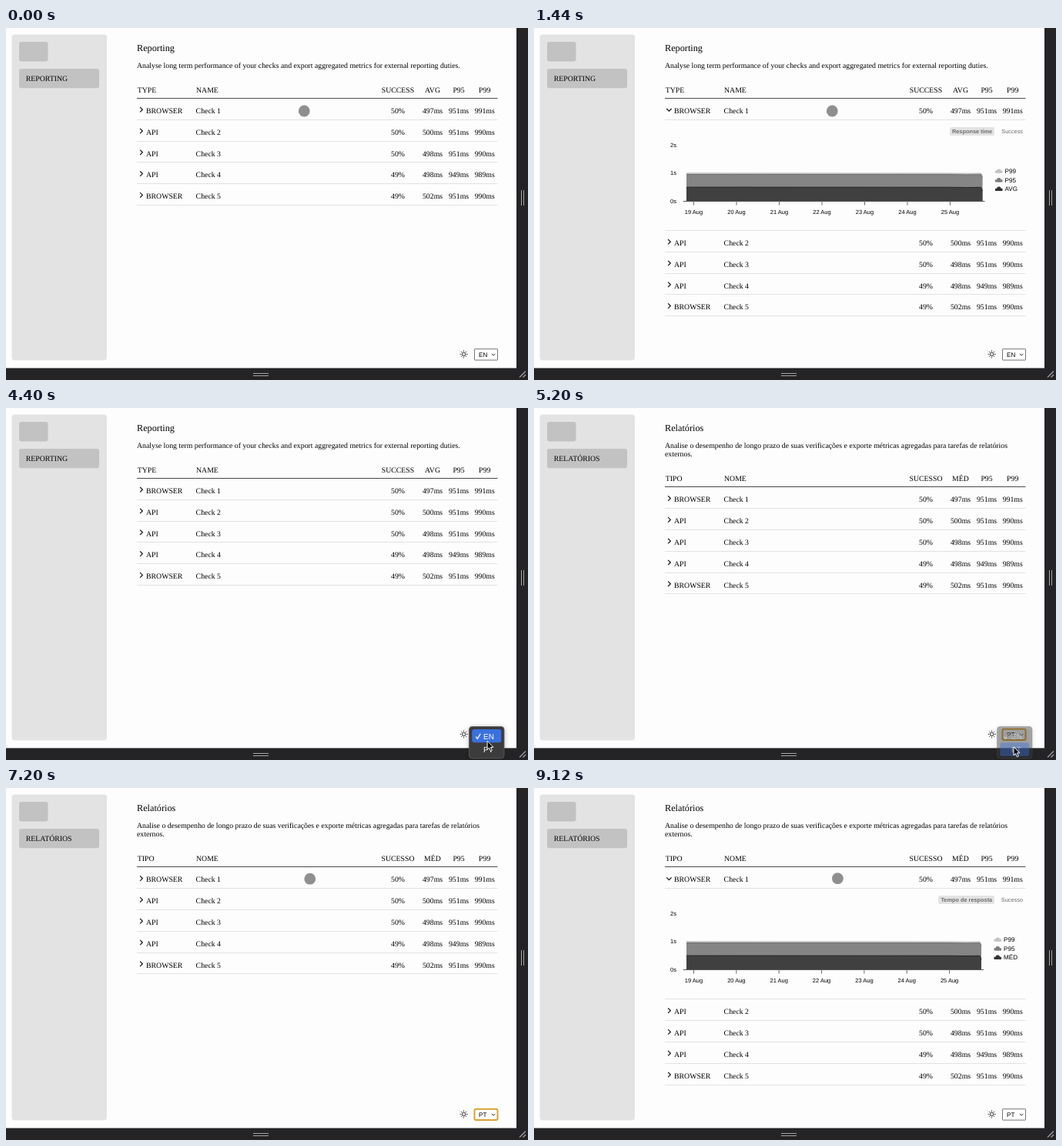
Animation of 678 by 458 pixels, one loop 9.28 s. Source, as an HTML page with a canvas:

```html
<!DOCTYPE html>
<html lang="en">
<head>
<meta charset="utf-8">
<title>Reporting</title>
<style>
  html, body { margin: 0; width: 100%; height: 100%; overflow: hidden; background: #fdfdfd; }
  canvas { display: block; width: 678px; height: 458px; }
</style>
</head>
<body>
<canvas id="stage"></canvas>
<script>
const W = 678, H = 458, LOOP = 9280, STEP = 80;
const SERIF = '"Liberation Serif", serif';
const SANS = '"Liberation Sans", sans-serif';
const BODY = '9.8px ' + SERIF;

const canvas = document.getElementById('stage');
const ctx = canvas.getContext('2d');
const dpr = window.devicePixelRatio || 1;
canvas.width = W * dpr;
canvas.height = H * dpr;

const EN = {
  title: 'Reporting', nav: 'REPORTING',
  intro: ['Analyse long term performance of your checks and export aggregated metrics for external reporting duties.'],
  type: 'TYPE', name: 'NAME', cols: ['SUCCESS', 'AVG', 'P95', 'P99'],
  tabs: ['Response time', 'Success'], tabX: 540, code: 'EN',
  shift: 0, end: 582.5, pitch: 55.5, legendX: 599
};
const PT = {
  title: 'Relatórios', nav: 'RELATÓRIOS',
  intro: ['Analise o desempenho de longo prazo de suas verificações e exporte métricas agregadas para tarefas de relatórios', 'externos.'],
  type: 'TIPO', name: 'NOME', cols: ['SUCESSO', 'MÉD', 'P95', 'P99'],
  tabs: ['Tempo de resposta', 'Sucesso'], tabX: 525, code: 'PT',
  shift: 11.4, end: 581, pitch: 55.35, legendX: 597.5
};
const COL_X = [509, 554, 588, 621.7];
const ROWS = [
  ['BROWSER', '50%', 497, 951, 991],
  ['API', '50%', 500, 951, 990],
  ['API', '50%', 498, 951, 990],
  ['API', '49%', 498, 949, 989],
  ['BROWSER', '49%', 502, 951, 990]
];
const PANEL = 144.2, ROW = 27.8;

const clamp = v => Math.max(0, Math.min(1, v));
const smooth = u => u * u * (3 - 2 * u);

// CSS "ease": cubic-bezier(.25, .1, .25, 1)
function cssEase(x) {
  let lo = 0, hi = 1;
  for (let i = 0; i < 20; i++) {
    const m = (lo + hi) / 2, n = 1 - m;
    if (.75 * n * n * m + .75 * n * m * m + m * m * m < x) lo = m; else hi = m;
  }
  const n = 1 - lo;
  return .3 * n * n * lo + 3 * n * lo * lo + lo * lo * lo;
}

function text(s, x, y, font = BODY, color = '#000', align = 'left') {
  ctx.font = font;
  ctx.fillStyle = color;
  ctx.textAlign = align;
  ctx.fillText(s, x, y);
}

function box(x, y, w, h, r, color) {
  ctx.fillStyle = color;
  ctx.beginPath();
  ctx.roundRect(x, y, w, h, r);
  ctx.fill();
}

function line(points, color, width = 1) {
  ctx.strokeStyle = color;
  ctx.lineWidth = width;
  ctx.beginPath();
  points.forEach(([x, y], i) => i ? ctx.lineTo(x, y) : ctx.moveTo(x, y));
  ctx.stroke();
}

const hline = (x0, x1, y, color) => line([[x0, y], [x1, y]], color);

function drawSidebar(lang) {
  box(7.5, 8.5, 123.5, 424, 4, '#e3e3e3');
  box(17, 18, 37.5, 25.5, 3, '#c2c2c2');
  box(17, 53, 104, 25.3, 3, '#c2c2c2');
  text(lang.nav, 25.7, 69.3);
}

function drawFrame() {
  box(663, 0, 15, H, 0, '#242426');
  box(0, 442.4, W, 15.6, 0, '#242426');
  const grip = '#a2a2a2';
  line([[669.5, 211], [669.5, 231]], grip);
  line([[672.5, 211], [672.5, 231]], grip);
  hline(321, 341, 449.5, grip);
  hline(321, 341, 452.5, grip);
  line([[667, 454.5], [675, 446.5]], grip, 1.2);
  line([[671.5, 454.5], [675, 451]], grip, 1.2);
}

function drawTable(lang, open) {
  const top = lang.shift;
  text(lang.title, 170, 30, '12.25px ' + SERIF);
  lang.intro.forEach((s, i) => text(s, 170, 52 + i * 11.3));
  text(lang.type, 170.7, 83.7 + top);
  text(lang.name, 247, 83.7 + top);
  lang.cols.forEach((s, i) => text(s, COL_X[i], 83.7 + top, BODY, '#000', 'center'));
  hline(170, 638.5, Math.floor(91 + top) + .5, '#4a4a4a');

  ROWS.forEach(([type, rate, ...ms], i) => {
    const y = 107.6 + top + i * ROW + (open && i ? PANEL : 0);
    if (open && !i) line([[172.2, y - 2.6], [175.4, y + .6], [178.6, y - 2.6]], '#111', 1.2);
    else line([[174.1, y - 4.6], [177.3, y - 1.4], [174.1, y + 1.8]], '#111', 1.2);
    const base = y + 3.3;
    text(type, 182, base);
    text('Check ' + (i + 1), 246.6, base);
    [rate, ...ms.map(v => v + 'ms')].forEach((s, c) => text(s, COL_X[c], base, BODY, '#000', 'center'));
    hline(170, 638.5, Math.floor(y + 11.7) + .5, '#e2e2e2');
  });
  if (open) hline(170, 638.5, Math.floor(119.3 + top + PANEL) + .5, '#e2e2e2');
}

function drawArea(end, value, dip, fill, stroke) {
  const y = 225.5 - value * 36.8;
  const top = [[198, y], [end - 45, y + .1], [end - 20, y + .4], [end - 2, y + .2], [end, y + dip]];
  ctx.fillStyle = fill;
  ctx.beginPath();
  ctx.moveTo(198, 225.5);
  top.forEach(p => ctx.lineTo(...p));
  ctx.lineTo(end, 225.5);
  ctx.fill();
  line(top, stroke);
}

function drawChart(lang, reveal) {
  const label = '7.5px ' + SANS;
  ctx.save();
  ctx.translate(0, Math.round(lang.shift));

  box(lang.tabX, 129, 598 - lang.tabX, 11, 2.5, '#e3e3e3');
  text(lang.tabs[0], 595.2, 137.2, 'bold 7.35px ' + SANS, '#6c6c6c', 'right');
  text(lang.tabs[1], 635, 137.2, '7.35px ' + SANS, '#6c6c6c', 'right');

  ['0s', '1s', '2s'].forEach((s, i) => text(s, 185, 228.2 - i * 36.8, label, '#000', 'right'));

  ctx.save();
  ctx.beginPath();
  ctx.rect(198, 140, (lang.end + 1 - 198) * reveal, 90);
  ctx.clip();
  drawArea(lang.end, .997, 4, '#c6c6c6', '#bdbdbd');
  drawArea(lang.end, .951, 4, '#858585', '#6e6e6e');
  drawArea(lang.end, .5, 5, '#404040', '#242424');
  ctx.restore();

  hline(194, lang.end + 3, 225.5, '#555');
  for (let i = 0; i < 7; i++) {
    const x = 207.5 + i * lang.pitch;
    line([[x, 225], [x, 230.5]], '#666');
    text(19 + i + ' Aug', x, 242, label, '#000', 'center');
  }

  [['P99', '#c4c4c4'], ['P95', '#7c7c7c'], [lang.cols[1], '#333']].forEach(([s, color], i) => {
    const x = lang.legendX, y = 186.2 + i * 11.6;
    box(x, y - .6, 9.5, 3.2, .5, color);
    box(x + 2.2, y - 2.8, 5.2, 5.4, 2, color);
    text(s, x + 12.5, y + 2.7, '8.1px ' + SANS);
  });
  ctx.restore();
}

function drawFooter(lang, focused) {
  ctx.strokeStyle = '#222';
  ctx.lineWidth = 1;
  ctx.beginPath();
  ctx.arc(594.6, 424.4, 2.2, 0, 7);
  ctx.stroke();
  for (let i = 0; i < 8; i++) {
    const c = Math.cos(i * Math.PI / 4), s = Math.sin(i * Math.PI / 4);
    line([[594.6 + 3.4 * c, 424.4 + 3.4 * s], [594.6 + 5 * c, 424.4 + 5 * s]], '#222', .9);
  }
  ctx.strokeStyle = focused ? '#d9a233' : '#767676';
  ctx.lineWidth = focused ? 2 : 1;
  ctx.fillStyle = '#fff';
  ctx.beginPath();
  ctx.roundRect(608.5, 417.7, 30, 14.4, focused ? 2 : .5);
  ctx.fill();
  ctx.stroke();
  text(lang.code, 614, 427.9, '8.17px ' + SANS);
  line([[631, 423.9], [633.2, 426.2], [635.4, 423.9]], '#333', 1);
}

function drawMenu(picked, alpha) {
  ctx.save();
  ctx.globalAlpha = alpha;
  ctx.shadowColor = 'rgba(0,0,0,.3)';
  ctx.shadowBlur = 6;
  ctx.shadowOffsetY = 1;
  box(601.5, 414.5, 45.5, 41.5, 4, '#3c3c3d');
  ctx.shadowColor = 'transparent';
  ctx.strokeStyle = '#616161';
  ctx.lineWidth = .8;
  ctx.stroke();
  box(605.3, picked ? 435.6 : 418, 38, 17.3, 3, '#3a70df');
  line([[610.3, 427.6], [612.4, 430.4], [616.2, 423.8]], '#fff', 1.3);
  text('EN', 620, 430.5, '10px ' + SANS, '#fff');
  text('PT', 620, 447.8, '10px ' + SANS, '#fff');
  ctx.restore();
}

// Start, end, from, to, sideways bend, easing
const MOVES = [
  [2400, 3040, [387.3, 108], [634.5, 440.5], [-11, 10.5], u => smooth(u) ** 1.43],
  [3120, 3440, [634.5, 440.5], [627.5, 424.5], [0, 0], smooth],
  [4000, 5360, [627.5, 424.5], [623, 441], [0, 0], u => 1 - (1 - u) ** 2.2],
  [5600, 7200, [623, 441], [394.8, 118.2], [-12.7, 23], u => 1 - (1 - u) ** 3],
  [9040, 9120, [394.8, 118.2], [394.4, 117.7], [0, 0], u => u]
];

function pointer(t) {
  const [start, end, from, to, bend, ease] = MOVES.filter(m => t >= m[0]).pop() || MOVES[0];
  const s = ease(clamp((t - start) / (end - start)));
  return [0, 1].map(k => from[k] + (to[k] - from[k]) * s + 4 * s * (1 - s) * bend[k]);
}

function drawPointer(t) {
  const [x, y] = pointer(t);
  if (t < 3600 || t >= 5680) {
    ctx.fillStyle = '#8f8f8f';
    ctx.beginPath();
    ctx.arc(x, y, 7.4, 0, 7);
    ctx.fill();
    return;
  }
  const shape = [[0, 0], [0, 11], [2.5, 8.7], [4.2, 13], [6.2, 12.2], [4.4, 8], [7.9, 8]];
  ctx.fillStyle = '#000';
  ctx.strokeStyle = '#fff';
  ctx.lineWidth = 1;
  ctx.beginPath();
  shape.forEach(([dx, dy]) => ctx.lineTo(x + dx, y + dy));
  ctx.closePath();
  ctx.fill();
  ctx.stroke();
}

function draw(t) {
  const lang = t < 5120 ? EN : PT;
  const opened = t < 2320 ? 480 : 7520;
  const open = t >= opened;

  ctx.setTransform(dpr, 0, 0, dpr, 0, 0);
  ctx.textRendering = 'geometricPrecision';
  ctx.fontKerning = 'normal';
  box(0, 0, W, H, 0, '#fdfdfd');
  drawSidebar(lang);
  drawTable(lang, open);
  if (open) drawChart(lang, cssEase(clamp((t - opened + 60) / 1000)));
  drawFooter(lang, t >= 3600 && t < 7520);
  drawFrame();
  if (t >= 3600 && t < 5360) drawMenu(pointer(t)[1] > 435.4, clamp(1 - (t - 4960) / 400));
  drawPointer(t);
}

const origin = performance.now();
function tick() {
  const t = (performance.now() - origin) % LOOP;
  draw(Math.floor(t / STEP) * STEP);
  requestAnimationFrame(tick);
}
tick();
</script>
</body>
</html>
```
